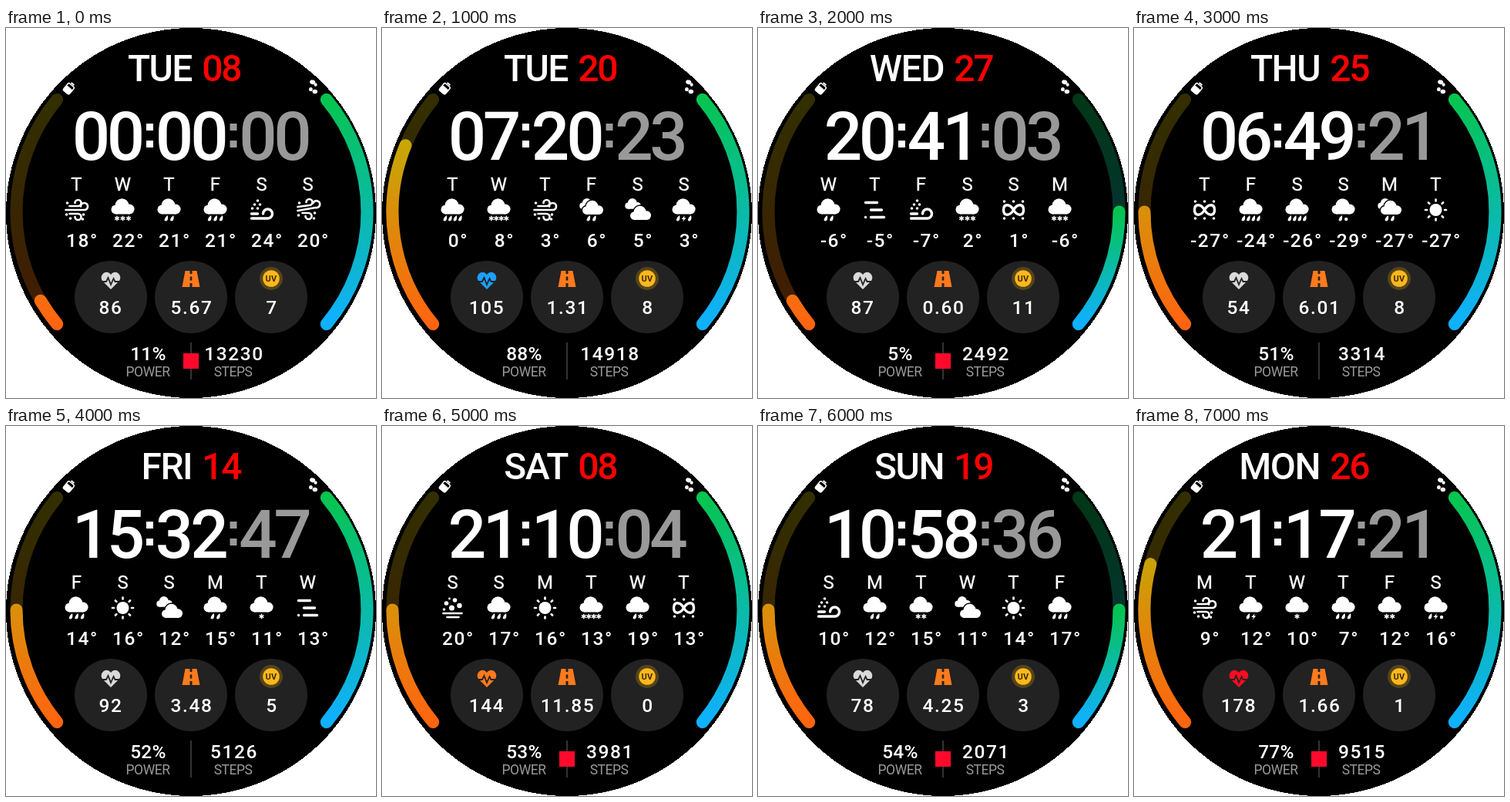
An HTML page for the animation above (8 s loop, 480x480 px).

```html
<!DOCTYPE html>
<html lang="en">
<head>
<meta charset="utf-8">
<title>Watch face</title>
<style>
html, body { margin: 0; width: 100%; height: 100%; overflow: hidden; background: #fff; }
svg { display: block; width: 100vw; height: 100vh; }
text { font-family: Roboto, sans-serif; font-weight: 500; fill: #fff; text-anchor: middle; }
.clock { font-size: 87px; font-stretch: 90%; }
.date { font-size: 48px; font-stretch: 92%; }
.name { font-size: 48px; letter-spacing: -1.5px; text-anchor: end; }
.day { font-size: 24px; font-weight: 400; stroke: #fff; stroke-width: .3; }
.num { font-size: 24.5px; letter-spacing: 1.6px; }
.pct { font-size: 24.5px; letter-spacing: .3px; }
.label { font-size: 17.5px; letter-spacing: -.5px; font-weight: 400; fill: #999; }
.uv { font-size: 11px; letter-spacing: .3px; font-weight: 700; fill: #3a2a08; }
.line { fill: none; stroke: #fff; stroke-width: 2.7; stroke-linecap: round; stroke-linejoin: round; }
.thick { stroke-width: 3.4; }
.arc { fill: none; stroke-width: 16; stroke-linecap: round; }
</style>
</head>
<body>
<svg viewBox="0 0 480 480">
  <defs>
    <linearGradient id="warm" gradientUnits="userSpaceOnUse" x1="0" y1="93" x2="0" y2="384">
      <stop offset="0" stop-color="#c4b400"/>
      <stop offset=".3" stop-color="#cba008"/>
      <stop offset="1" stop-color="#ff6410"/>
    </linearGradient>
    <linearGradient id="cool" x1="0" y1="0" x2="0" y2="1">
      <stop offset="0" stop-color="#06c450"/>
      <stop offset="1" stop-color="#10b0ff"/>
    </linearGradient>
    <g id="cloud">
      <circle cx="-1" cy="-6" r="8.8"/>
      <circle cx="-9" cy="-.5" r="6"/>
      <circle cx="8.6" cy="-1" r="6.5"/>
      <rect x="-9" y="-3" width="18" height="8.5"/>
    </g>
  </defs>

  <circle cx="240" cy="240" r="240" shape-rendering="crispEdges"/>
  <g id="arcs"></g>

  <g transform="translate(82 78) rotate(40)" fill="#fff">
    <rect x="-5" y="-5" width="10" height="12" rx="2" fill="none" stroke="#fff" stroke-width="1.5"/>
    <rect x="-2.5" y="-8" width="5" height="2"/>
    <rect x="-5" y="-1" width="10" height="8" rx="1.5"/>
  </g>
  <g transform="translate(398 76.5)" fill="#fff">
    <ellipse cx="-2" cy="-6" rx="3.6" ry="2.8" transform="rotate(15)"/>
    <ellipse cx="3.6" cy="-3" rx="2" ry="2.2"/>
    <ellipse cx="-2.6" cy="3" rx="2.4" ry="2.6"/>
    <ellipse cx="2.8" cy="6" rx="3.2" ry="2.8"/>
  </g>

  <g fill="#fff">
    <path d="M182 124h9v9h-9zM182 146h9v9h-9z"/>
    <path d="M290.500 124h9v9h-9zM290.500 146h9v9h-9z" fill="#999"/>
  </g>

  <g fill="#222">
    <circle cx="136" cy="349" r="47"/>
    <circle cx="240" cy="349" r="47"/>
    <circle cx="344" cy="349" r="47"/>
  </g>
  <path d="M232.500 315h6v4h3v-4h6l4 21h-10v-5h-3v5h-10z" fill="#ff7a1c"/>
  <path d="M238.700 322.500h2.600v5h-2.600z" fill="#222"/>
  <circle cx="344" cy="325" r="15" fill="#56451a"/>
  <circle cx="344" cy="325" r="10.8" fill="#ffb71c"/>
  <text class="uv" x="344" y="329">UV</text>

  <path d="M240 408V456" stroke="#444" stroke-width="1.5"/>
  <text class="label" x="184" y="452">POWER</text>
  <text class="label" x="294.500" y="452">STEPS</text>
  <g id="live"></g>
</svg>

<script>
const HOLD = 1000;
const WEEK = ['SUN', 'MON', 'TUE', 'WED', 'THU', 'FRI', 'SAT'];
const HEART = { low: '#dadada', mild: '#1ca0ff', high: '#ff7a1c', max: '#ff0c20' };

// Sky: names are standalone icons; "+" is a cloud, "~" a cloud with one behind,
// followed by r(ain), s(now), b(olt), o (hail).
const scene = (day, date, clock, sky, temps, pulse, zone, dist, uv, power, steps, left, right, link) =>
  ({ day, date, clock, sky: sky.split(' '), temps: temps.split(' '), pulse, zone, dist, uv, power, steps, left, right, link });

const scenes = [
  scene(2, '08', '000000', 'wind +sss +rr +rrr curl gust', '18 22 21 21 24 20', 86, 'low', '5.67', 7, 11, 13230, .118, 1, true),
  scene(2, '20', '072023', '+rrrr +ssss wind ~rr clouds +rbr', '0 8 3 6 5 3', 105, 'mild', '1.31', 8, 88, 14918, .78, 1, false),
  scene(3, '27', '204103', '+rr fog curl +sss haze +sss', '-6 -5 -7 2 1 -6', 87, 'low', '0.60', 11, 5, 2492, .118, .5, true),
  scene(4, '25', '064921', 'haze +rrrr +rrrr +ro ~rr sun', '-27 -24 -26 -29 -27 -27', 54, 'low', '6.01', 8, 51, 3314, .5, 1, false),
  scene(5, '14', '153247', '+rrr sun clouds +rr +s fog', '14 16 12 15 11 13', 92, 'low', '3.48', 5, 52, 5126, .5, 1, false),
  scene(6, '08', '211004', 'sand +rrr sun +ssss +rs haze', '20 17 16 13 19 13', 144, 'high', '11.85', 0, 53, 3981, .5, 1, true),
  scene(0, '19', '105836', 'curl +rr +ss clouds sun +rrr', '10 12 15 11 14 17', 78, 'low', '4.25', 3, 54, 2071, .5, .5, true),
  scene(1, '26', '211721', 'wind +rb +s +rrr +ss +rbo', '9 12 10 7 12 16', 178, 'max', '1.66', 1, 77, 9515, .69, 1, true)
];

const line = (d, cls = '') => `<path class="line ${cls}" d="${d}"/>`;
const dot = (x, y, r = 1.8) => `<circle cx="${x}" cy="${y}" r="${r}"/>`;
const text = (cls, x, y, s, fill = '#fff') => `<text class="${cls}" x="${x}" y="${y}" style="fill:${fill}">${s}</text>`;
const at = (x, y, s) => `<g transform="translate(${x} ${y})">${s}</g>`;

const rays = Array.from({ length: 8 }, (_, i) =>
  `<path class="line" d="M0 -11.500V-13.500" transform="rotate(${i * 45})"/>`).join('');

const flake = [0, 60, 120].map(a =>
  `<path d="M0 -3.300V3.300" stroke="#fff" stroke-width="1.5" transform="rotate(${a})"/>`).join('');

const drops = {
  r: '<path d="M2 -4C3 0 2 3.500 -.5 3.500S-3 0 2 -4Z"/>',
  s: flake,
  b: '<path d="M1.500 -4L-3 1H-.3L-1.500 4.500L3 -.7H.4Z"/>',
  o: dot(0, 1, 2.2)
};

const cloud = '<use href="#cloud"/>';
const back = '<use href="#cloud" transform="translate(-5 -5) scale(.68)"/>';
const front = '<use href="#cloud" stroke="#000" stroke-width="3" transform="translate(2 1) scale(.9)"/>'
  + '<use href="#cloud" transform="translate(2 1) scale(.9)"/>';

const icons = {
  wind: line('M-9 -5H2a4 4 0 1 0 -4 -4M-14 0H10a4.500 4.500 0 1 0 -4.500 -4.500M-9 5H2a4 4 0 1 1 -4 4')
    + dot(-12, -9) + dot(-13, 6) + dot(9, 6) + dot(-8, 11) + dot(8, 12),
  gust: line('M-13 -4L2 -6a4 4 0 1 0 -4 -4M-13 1L10 -3a4.500 4.500 0 1 0 -3 -6M-7 4H1a4 4 0 1 1 -4 4')
    + dot(-11, -9) + dot(-12, 7) + dot(9, 4) + dot(8, 11),
  curl: line('M-13 5H-5M-13 11H8a6 6 0 1 0 -6 -6', 'thick')
    + dot(-12, -2) + dot(-5, -2) + dot(-9, -7) + dot(-2, -7) + dot(-5, -12),
  fog: line('M-12 -9.500H3M-5 0H9M-12 9.500h.1M-5 9.500H12', 'thick'),
  haze: line('M0 0C-5 -8.500 -13 -8 -13 0S-5 8.500 0 0S13 -8 13 0S5 8.500 0 0', 'thick')
    + [-12, 0, 12].map(x => dot(x, -11) + dot(x, 11)).join(''),
  sand: line('M-12 7H12M-7 12H8') + dot(-8, -6, 2.8) + dot(3, -10, 2.8)
    + dot(9, -3, 3.2) + dot(-1, 0, 3.5) + dot(-11, 2) + dot(-4, -12, 1.4),
  sun: dot(0, 0, 8) + rays,
  clouds: at(-1, 0, back) + at(2, 7, front)
};

function weather(key) {
  if (icons[key]) return icons[key];
  const list = [...key.slice(1)];
  const gap = list.length > 3 ? 6.5 : 7.5;
  return (key[0] === '~' ? back + front : cloud)
    + list.map((k, i) => at((i - (list.length - 1) / 2) * gap, 11, drops[k])).join('');
}

// Side arcs rise from the lower end; part runs 0 to 1.
function arc(side, part, paint, opacity = 1) {
  const r = 227.5, span = 39.8;
  const point = deg => {
    const a = deg * Math.PI / 180;
    return `${241 + side * r * Math.cos(a)} ${238.5 + r * Math.sin(a)}`;
  };
  const d = `M${point(span)}A${r} ${r} 0 0 ${side < 0 ? 1 : 0} ${point(span - 2 * span * part)}`;
  return `<path class="arc" d="${d}" stroke="url(#${paint})" opacity="${opacity}"/>`;
}

const heart = color => at(136, 327,
  `<path d="M0 12L-11 1C-16 -6 -6 -15 0 -7C6 -15 16 -6 11 1Z" fill="${color}"/>`
  + '<path d="M-13 2H-6L-3.500 -3L0 6L3.500 -2L5.500 2H13" fill="none" stroke="#222" stroke-width="1.800"/>');

const $ = id => document.getElementById(id);
let shown = -1;

function render(now) {
  const n = Math.floor(now / HOLD) % scenes.length;
  if (n === shown) return;
  shown = n;
  const s = scenes[n];

  $('arcs').innerHTML = arc(-1, 1, 'warm', .26) + arc(-1, s.left, 'warm')
    + arc(1, 1, 'cool', .28) + arc(1, s.right, 'cool');

  const forecast = s.sky.map((key, i) => {
    const x = 91.5 + 60 * i;
    return text('day', x, 210.5, WEEK[(s.day + i) % 7][0])
      + at(x, 236, `<g fill="#fff">${weather(key)}</g>`)
      + text('num', x + 7.5, 284, s.temps[i] + '°');
  }).join('');

  $('live').innerHTML = text('name', 241, 69, WEEK[s.day])
    + text('date', '268 293', 69, s.date, '#ff0000')
    + text('clock', '110.5 155.5 218.5 264', 170.5, s.clock.slice(0, 4))
    + text('clock', '327 372', 170.5, s.clock.slice(4), '#999')
    + forecast
    + heart(HEART[s.zone])
    + text('num', 136, 371, s.pulse)
    + text('num', 241, 371, s.dist)
    + text('num', 345, 371, s.uv)
    + text('pct', 184.5, 431, s.power + '%')
    + text('num', 296, 431, s.steps)
    + (s.link ? '<rect x="230" y="422" width="20" height="20" fill="#ff0a2b"/>' : '');
}

function tick() {
  render(performance.now());
  requestAnimationFrame(tick);
}
tick();
</script>
</body>
</html>
```
